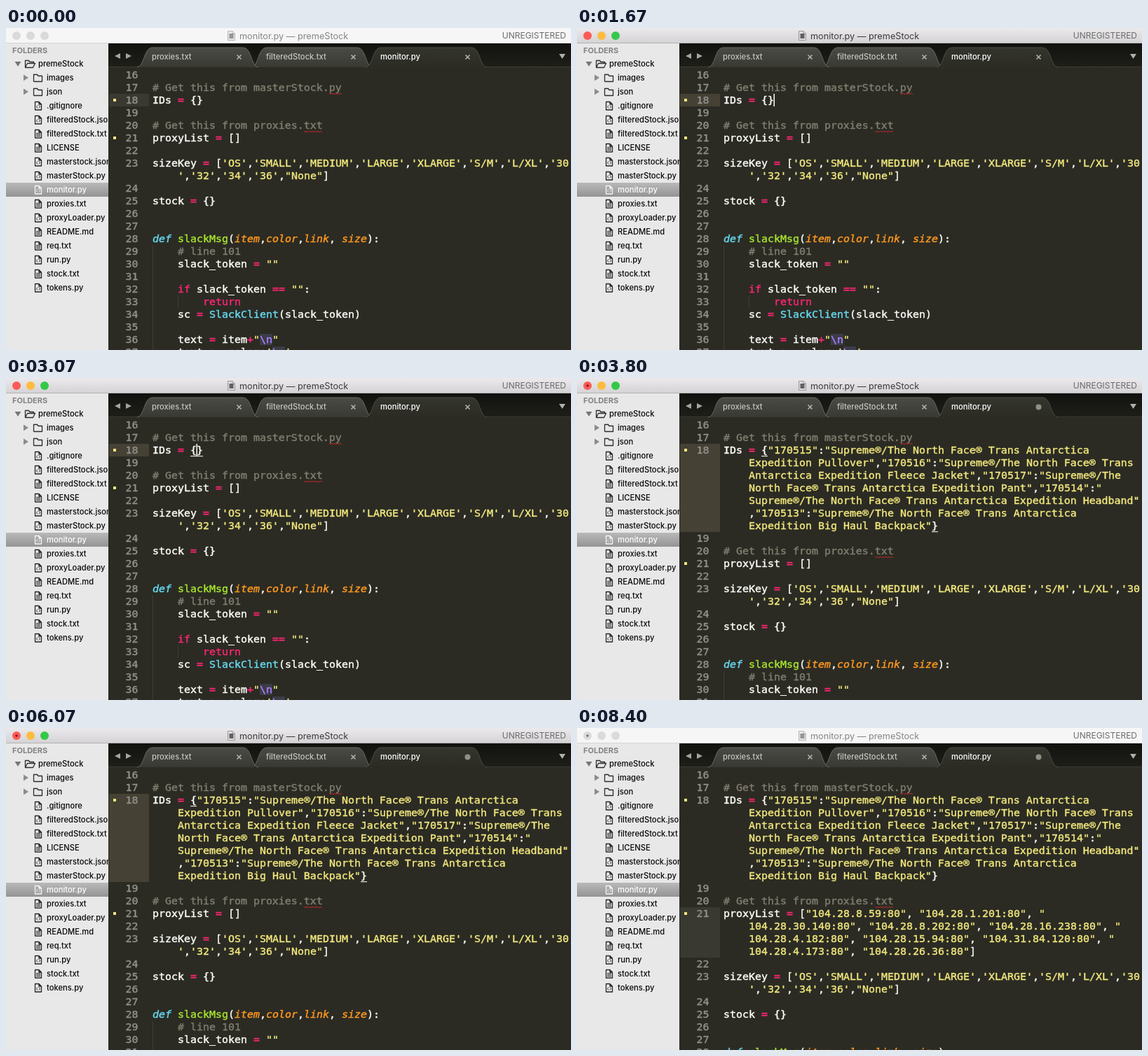
Write an HTML page with a canvas that moves like this. It is 806 px wide and 460 px high and loops after 8470 ms.

```html
<!DOCTYPE html>
<html lang="en">
<head>
<meta charset="utf-8">
<title>Editor</title>
<style>
html, body { margin: 0; width: 100%; height: 100%; overflow: hidden; background: #2b2b24; }
canvas { display: block; }
</style>
</head>
<body>
<canvas id="stage" width="806" height="460"></canvas>
<script>
const c = document.getElementById('stage').getContext('2d');
const LOOP = 8470, CHAR = 9, ROW = 18, TOP = 58;
const MONO = '14.95px "DejaVu Sans Mono", monospace';
const UI = 'Inter, sans-serif', LABEL = '500 11.2px ' + UI;
const WHITE = '#fbfbf6', PINK = '#f92672', YELLOW = '#f0e67c', BLUE = '#66d9ef';

// "~" marks a soft wrap inside a line.
const IDS = '"170515":"Supreme®/The North Face® Trans Antarctica~' +
  'Expedition Pullover","170516":"Supreme®/The North Face® Trans~' +
  'Antarctica Expedition Fleece Jacket","170517":"Supreme®/The~' +
  'North Face® Trans Antarctica Expedition Pant","170514":"~' +
  'Supreme®/The North Face® Trans Antarctica Expedition Headband"~' +
  ',"170513":"Supreme®/The North Face® Trans Antarctica~' +
  'Expedition Big Haul Backpack"';
const PROXIES = '"104.28.8.59:80", "104.28.1.201:80", "~' +
  '104.28.30.140:80", "104.28.8.202:80", "104.28.16.238:80", "~' +
  '104.28.4.182:80", "104.28.15.94:80", "104.31.84.120:80", "~' +
  '104.28.4.173:80", "104.28.26.36:80"';
const code = (ids, proxies) => String.raw`
# Get this from masterStock.py
IDs = {${ids}}

# Get this from proxies.txt
proxyList = [${proxies}]

sizeKey = ['OS','SMALL','MEDIUM','LARGE','XLARGE','S/M','L/XL','30~','32','34','36',"None"]

stock = {}


def slackMsg(item,color,link, size):
    # line 101
    slack_token = ""

    if slack_token == "":
        return
    sc = SlackClient(slack_token)

    text = item+"\n"
    text += color+'\n'`;

const plain = {
  'filteredStock.txt': [
    '"170515":"Supreme®/The North Face® Trans Antarctica Expedition ',
    'Pullover","170516":"Supreme®/The North Face® Trans Antarctica ',
    'Expedition Fleece Jacket","170517":"Supreme®/The North Face® Trans ',
    'Antarctica Expedition Pant","170514":"Supreme®/The North Face® ',
    'Trans Antarctica Expedition Headband","170513":"Supreme®/The North ',
    'Face® Trans Antarctica Expedition Big Haul Backpack"'],
  'proxies.txt': [
    '["104.28.8.59:80", "104.28.1.201:80", "104.28.30.140:80", ',
    '"104.28.8.202:80", "104.28.16.238:80", "104.28.4.182:80", ',
    '"104.28.15.94:80", "104.31.84.120:80", "104.28.4.173:80", ',
    '"104.28.26.36:80"]']
};
const TABS = ['proxies.txt', 'filteredStock.txt', 'monitor.py'];
const FILES = ['.gitignore', 'filteredStock.json', 'filteredStock.txt', 'LICENSE',
  'masterstock.json', 'masterStock.py', 'monitor.py', 'proxies.txt', 'proxyLoader.py',
  'README.md', 'req.txt', 'run.py', 'stock.txt', 'tokens.py'];

// carets and brackets are [row, x column]; wrapped rows start at column 4
const OPEN_ID = [2, 6], OPEN_LIST = [11, 12];
const base = { file: 'monitor.py', ids: '', proxies: '', line: 18, active: true, marks: [] };
const steps = [
  { at: 0, active: false },
  { at: 400, file: 'filteredStock.txt' },
  { at: 1500, caret: [2, 8] },
  { at: 1950, caret: [2, 7], marks: [OPEN_ID, [2, 7]] },
  { at: 3150, ids: IDS, caret: [8, 33], marks: [OPEN_ID, [8, 33]] },
  { at: 4130, ids: IDS, file: 'proxies.txt' },
  { at: 5500, ids: IDS, caret: [8, 33], marks: [OPEN_ID, [8, 33]] },
  { at: 6500, ids: IDS, line: 21, caret: [11, 13], marks: [OPEN_LIST, [11, 13]] },
  { at: 7300, ids: IDS, proxies: PROXIES, line: 21, caret: [14, 39], marks: [OPEN_LIST, [14, 39]] },
  { at: 8130, ids: IDS, proxies: PROXIES, line: 21, active: false }
].map(s => ({ ...base, ...s }));

function box(x, y, w, h, fill) {
  c.fillStyle = fill;
  c.fillRect(x, y, w, h);
}
function fade(y0, y1, from, to) {
  const g = c.createLinearGradient(0, y0, 0, y1);
  g.addColorStop(0, from);
  g.addColorStop(1, to);
  return g;
}
function text(s, x, y, font, fill, align = 'left') {
  c.font = font;
  c.fillStyle = fill;
  c.textAlign = align;
  c.fillText(s, x, y);
}
// Editor text gets a hairline outline for its heavier smoothing.
function mono(s, x, y, fill, style = '', align = 'left') {
  text(s, x, y, style + MONO, fill, align);
  c.strokeStyle = fill;
  c.lineWidth = .45;
  c.lineJoin = 'round';
  c.strokeText(s, x, y);
}
function dot(x, y, r, fill) {
  c.fillStyle = fill;
  c.beginPath();
  c.arc(x, y, r, 0, 7);
  c.fill();
}
function shape(points, fill) {
  c.fillStyle = fill;
  c.fill(new Path2D('M' + points + 'Z'));
}
function line(path, stroke, width = 1) {
  c.strokeStyle = stroke;
  c.lineWidth = width;
  c.stroke(new Path2D(path));
}

function titleBar(s, dirty) {
  box(0, 0, 806, 22, s.active ? fade(0, 22, '#ebe9eb', '#d4d2d4') : '#f6f6f6');
  box(0, 21, 806, 1, s.active ? '#b4b2b4' : '#d6d6d6');
  ['#fc5b57', '#fdbc40', '#34c84a'].forEach((col, i) =>
    dot(15 + 20 * i, 11, 6, s.active ? col : '#dadada'));
  const isCode = s.file === 'monitor.py';
  if (dirty && isCode) dot(15, 11, 1.8, s.active ? '#8a1712' : '#777');

  const name = s.file + ' — premeStock', font = '12.7px ' + UI;
  c.font = font;
  const x = Math.round(402.5 - (c.measureText(name).width + 17) / 2);
  c.globalAlpha = s.active ? 1 : .6;
  shape(`${x},4.500h7l4,4v10h-11`, isCode ? '#dedede' : '#fdfdfd');
  line(`M${x + .5},4.500h6.500l3.500,3.500v9.500h-10Z M${x + 7},4.500v4h4`, isCode ? '#999' : '#bbb');
  if (isCode) box(x + 2.5, 8, 6, 7, '#606060');
  c.globalAlpha = 1;
  text(name, x + 17, 16, font, s.active ? '#3c3c3c' : '#868686');
  text('UNREGISTERED', 799, 15, '12px ' + UI, '#6c6c6c', 'right');
}

function folder(x, y, open) {
  line(`M${x + .5},${y + 5.5}v-10h5l1.500,2h5.500v${open ? 2 : 8}${open ? 'm-12,6l3,-6h11l-3,6Z' : 'h-12'}`, '#2c2c2c', 1.3);
}
function fileIcon(y, name, col) {
  line(`M41.500,${y - 5.5}h5.500l3.500,3.500v8h-9Z M47,${y - 5.5}v3.500h3.500`, col, 1.3);
  line(/txt|LICENSE|md/.test(name)
    ? `M43,${y - .5}h6M43,${y + 1.5}h6M43,${y + 3.5}h6`
    : `M45,${y - .5}l-1.500,2l1.500,2M47,${y - .5}l1.500,2l-1.500,2`, col);
}
function sidebar(s) {
  const ink = '#080808';
  c.save();
  c.beginPath();
  c.rect(0, 22, 146, 438);
  c.clip();
  box(0, 22, 146, 438, '#e8e8e8');
  text('FOLDERS', 9, 36, 'bold 11px ' + UI, '#838383');
  shape('12.5,48h9l-4.500,7', '#777');
  folder(27, 51, true);
  text('premeStock', 46, 55, LABEL, ink);
  ['images', 'json'].forEach((name, i) => {
    const y = 71 + 20 * i;
    shape(`25,${y - 4.5}v9l7,-4.500`, '#8b8b8b');
    folder(39, y, false);
    text(name, 58, y + 4, LABEL, ink);
  });
  FILES.forEach((name, i) => {
    const y = 111 + 20 * i, on = name === s.file;
    if (on) box(0, y - 10, 146, 20, fade(y - 10, y + 10, '#b9b9b9', '#949494'));
    fileIcon(y, name, on ? '#f4f4f4' : '#262626');
    text(name, 58, y + 4, LABEL, on ? '#fff' : ink);
  });
  c.restore();
}

function tab(i, s, dirty) {
  const l = 187 + 163 * i, r = l + 173, on = TABS[i] === s.file;
  const edge = `M${l},56C${l + 11},55 ${l + 9},28 ${l + 22},28H${r - 22}C${r - 9},28 ${r - 11},55 ${r},56`;
  c.fillStyle = on ? fade(28, 56, '#34352d', '#2b2b24') : fade(28, 56, '#4b4b46', '#393934');
  c.fill(new Path2D(edge + 'Z'));
  line(edge, on ? '#4d4d46' : '#6a6a64');
  text(TABS[i], l + 21, 45, LABEL, on ? '#fff' : '#c6c6c1');
  const x = l + 145;
  if (dirty && i === 2) dot(x + .5, 41.5, 4, '#8f8f8a');
  else line(`M${x - 2.5},38.500l6,6m0,-6l-6,6`, '#b0b0ab', 1.7);
}
function tabBar(s, dirty) {
  box(146, 22, 660, 34, fade(22, 56, '#11110e', '#1f1f1a'));
  box(146, 55, 660, 1, '#3a3a34');
  const current = TABS.indexOf(s.file);
  [2, 1, 0].filter(i => i !== current).concat(current).forEach(i => tab(i, s, dirty));
  shape('163,36v8l-8,-4', '#a5a5a0');
  shape('171,36v8l8,-4', '#a5a5a0');
  shape('789,37h9l-4.500,7', '#b0b0ab');
}

const rowY = row => TOP + row * ROW;
function caret(row, x) {
  box(x - .5, rowY(row), 1.5, ROW, WHITE);
}

const TOKEN = /#.*|["'](?=\\n)|\\n|(?<=\\n)["']|"[^"]*"|'[^']*'|\bdef\b|\bslackMsg\b|(?<=def .*)\b(?:item|color|link|size)\b|\bSlackClient\b|\bif\b|\breturn\b|[=+]+|\n|~|[^\s"'=+#~\\]|[ ]/g;
function colour(tok) {
  if (tok[0] === '#') return '#7f7c6e';
  if (tok === '\\n') return '#ae81ff';
  if (/^["']/.test(tok)) return YELLOW;
  if (/^(def|SlackClient)$/.test(tok)) return BLUE;
  if (tok === 'slackMsg') return '#a6e22e';
  if (/^(item|color|link|size)$/.test(tok)) return '#fd971f';
  if (/^(if|return|[=+]+)$/.test(tok)) return PINK;
  return WHITE;
}
function squiggle(x, y, w) {
  let path = `M${x},${y}`;
  for (let i = 2; i <= w; i += 2) path += `L${x + i},${y + (i % 4 ? 2 : 0)}`;
  line(path, '#c3272b');
}
function codeView(s, blink) {
  const src = code(s.ids, s.proxies), x0 = 209;
  let row = 0;
  src.split('\n').forEach((ln, i) => {
    const n = 16 + i, rows = ln.split('~').length, y = rowY(row);
    if (n === s.line) box(147, y, 57, rows * ROW, s.active ? '#454134' : '#393932');
    if (n === 18 || n === 21) box(153, y + 7, 4, 4, YELLOW);
    if (n > 28) box(x0, y, 1, ROW, '#3d3d35');
    if (n === 33) box(x0 + 4 * CHAR, y, 1, ROW, '#3d3d35');
    mono(n, 188.5, y + 14, '#8f908a', '', 'right');
    row += rows;
  });

  row = 0;
  let col = 0;
  for (const [tok] of src.matchAll(TOKEN)) {
    const fill = colour(tok);
    const style = tok === 'def' || fill === '#fd971f' ? 'italic ' : '';
    tok.split(/([~\n])/).forEach(part => {
      if (part === '~' || part === '\n') {
        row++;
        col = part === '~' ? 4 : 0;
        return;
      }
      const x = x0 + col * CHAR, y = rowY(row);
      if (part === '\\n') box(x, y + 1, 2 * CHAR, 16, '#3b3c48');
      if (part.trim()) mono(part, x, y + 14, fill, style);
      const word = /^#.*\.(py|txt)$/.exec(part);
      if (word) squiggle(x + (part.length - word[1].length) * CHAR, y + 17, word[1].length * CHAR);
      col += part.length;
    });
  }
  s.marks.forEach(([r, k]) => box(x0 + k * CHAR, rowY(r) + 17, CHAR, 1.2, '#deded8'));
  if (s.caret && blink) caret(s.caret[0], x0 + s.caret[1] * CHAR);
}

function plainView(s, t, blink) {
  const rows = plain[s.file], x0 = 200, last = rows.length - 1;
  let from = [0, 0], head = [last, rows[last].length];
  if (s.file === 'proxies.txt') {
    // Dragged backwards from the end of the text to its start.
    const left = 1 - Math.min(1, Math.max(0, (t - 4470) / 312));
    from = head = [Math.min(3, Math.floor(4 * left)), Math.round(18 * left)];
  }
  box(147, TOP, 48, rows.length * ROW, '#454134');
  mono('*', 155, TOP + 15, WHITE, 'bold ', 'center');
  mono('1', 179.5, TOP + 14, '#8f908a', '', 'right');
  rows.forEach((r, i) => {
    const y = rowY(i), start = i < from[0] ? r.length : i === from[0] ? from[1] : 0;
    if (start < r.length) {
      c.fillStyle = '#514f45';
      c.beginPath();
      c.roundRect(x0 + start * CHAR, y, (r.length - start) * CHAR, ROW, 2);
      c.fill();
      for (let k = start; k < r.length; k++)
        if (r[k] === ' ') box(x0 + (k + .5) * CHAR - .5, y + 9, 1.2, 1.2, '#747266');
    }
    mono(r, x0, y + 14, WHITE);
  });
  if (blink) caret(head[0], x0 + head[1] * CHAR);
}

function draw(now) {
  const t = now % LOOP;
  const s = steps.findLast(step => step.at <= t);
  const dirty = s.ids !== '';
  const dragging = s.file === 'proxies.txt' && t > 4470 && t < 5000;
  const blink = s.active && (dragging || (t - s.at) % 1000 < 500);
  box(0, 0, 806, 460, '#2b2b24');
  if (s.file === 'monitor.py') codeView(s, blink);
  else plainView(s, t, blink);
  tabBar(s, dirty);
  sidebar(s);
  titleBar(s, dirty);
  requestAnimationFrame(draw);
}
requestAnimationFrame(draw);
</script>
</body>
</html>
```
